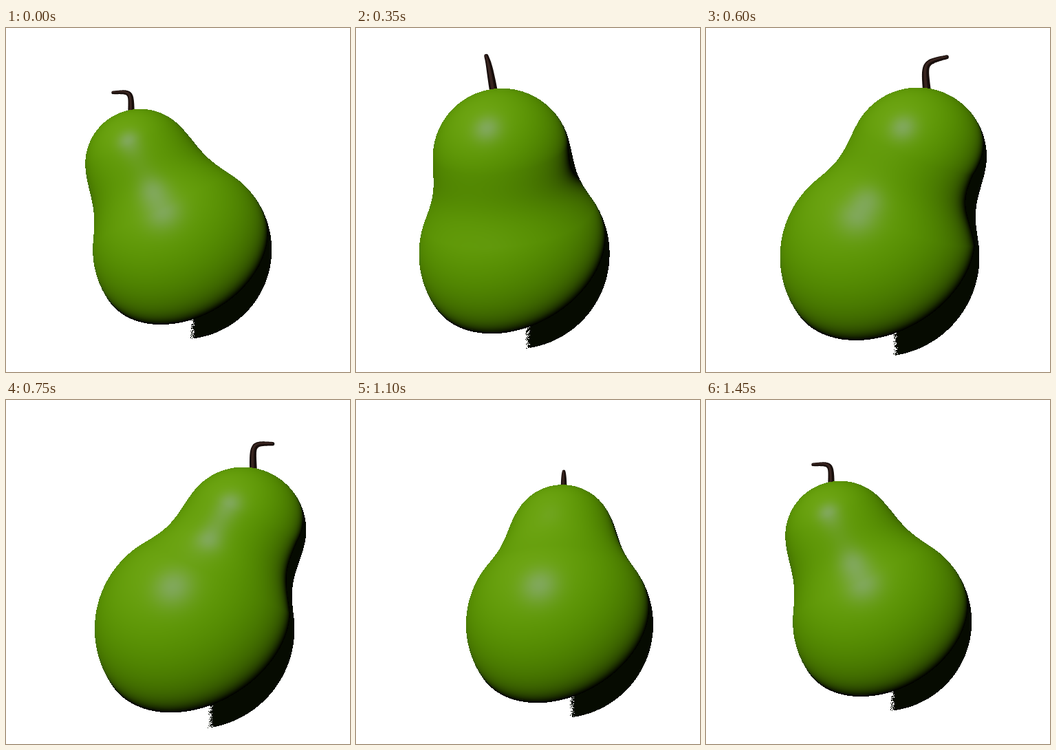
Animation, 500 px wide and 500 px high, one loop 1.5 s. Source, as an HTML page with a canvas:

```html
<!DOCTYPE html>
<html lang="en">
<head>
<meta charset="utf-8">
<title>Turning pear</title>
<style>
  html, body { margin: 0; width: 100%; height: 100%; overflow: hidden; background: #fff; }
  canvas { display: block; width: 500px; height: 500px; }
</style>
</head>
<body>
<canvas id="stage" width="500" height="500"></canvas>
<script>
const SIZE = 500, STEPS = 30, STEP_MS = 50, BLEND = 54;
const stage = document.getElementById('stage').getContext('2d');
const cache = [];

// Stem poses: step, then base, bend and tip relative to the top of the neck.
const STEM = [
  [0, -13, 3, -13, -26, -41, -24],
  [7, -12, 4, -19, -36, -23, -48],
  [12, 13, 3, 9, -37, 44, -45],
  [18, 12, 3, 13, -31, 33, -23],
  [22, 2, 3, 2, -16, 2, -20],
  [26, -8, 2, -8, -26, -27, -19],
  [29, -13, 3, -13, -26, -41, -24]
];

// Mean plus first and second harmonics of the turn angle.
const wave = (a, mean, c1, s1, c2 = 0, s2 = 0) =>
  mean + c1 * Math.cos(a) + s1 * Math.sin(a) + c2 * Math.cos(2 * a) + s2 * Math.sin(2 * a);

const random = (x, y) => {
  const v = Math.sin(x * 12.9898 + y * 78.233) * 43758.5453;
  return v - Math.floor(v);
};

function pose(a) {
  return {
    bulb: { x: wave(a, 263.4, -7.2, -33), y: wave(a, 327.6, -5.3, 1),
            z: wave(a, 0, -33, 7), r: wave(a, 137.4, -7.7, 1.25) },
    neck: { x: wave(a, 264, -73, -43.8, 4, -2.3), y: wave(a, 193, 4.5, -5),
            z: wave(a, 0, -36, 62), r: wave(a, 87, -6.7, 12.8, -0.85, -0.9) }
  };
}

// Marches along z to the blended surface; returns its normal or null.
function hit(px, py, bulb, neck) {
  const bx = px - bulb.x, by = py - bulb.y, nx = px - neck.x, ny = py - neck.y;
  const bFlat = bx * bx + by * by, nFlat = nx * nx + ny * ny;
  let z = 200;
  for (let i = 0; i < 60 && z > -180; i++) {
    const bz = z - bulb.z, nz = z - neck.z;
    const bLen = Math.sqrt(bFlat + bz * bz), nLen = Math.sqrt(nFlat + nz * nz);
    const db = bLen - bulb.r, dn = nLen - neck.r;
    const h = Math.max(0, Math.min(1, 0.5 + 0.5 * (db - dn) / BLEND));
    const d = db + (dn - db) * h - BLEND * h * (1 - h);
    if (d < 0.3) {
      const u = (1 - h) / bLen, v = h / nLen;
      const x = bx * u + nx * v, y = by * u + ny * v, w = bz * u + nz * v;
      const len = Math.hypot(x, y, w);
      return [x / len, y / len, w / len];
    }
    z -= d;
  }
  return null;
}

function shade([x, y, z]) {
  const lit = (-0.35 * x - 0.6 * y + 0.72 * z + 0.065) / 1.065;
  if (lit <= 0) return null;
  const green = 160 * Math.pow(lit, 0.33) * (1 - Math.exp(-14 * lit)), glow = lit ** 4;
  const shine = Math.pow(Math.max(0, -0.215 * x - 0.42 * y + 0.882 * z), 45);
  return [green * 0.6 + 12 * glow + 22 * shine, green + 4 * glow + 6 * shine, 18 * glow + 72 * shine];
}

function stemAt(step) {
  const last = STEM.length - 1;
  let i = 0;
  while (i < last - 1 && step >= STEM[i + 1][0]) i++;
  const p0 = STEM[(i + last - 1) % last], p1 = STEM[i], p2 = STEM[i + 1], p3 = STEM[(i + 2) % last];
  const t = (step - p1[0]) / (p2[0] - p1[0]);
  return p1.slice(1).map((b, k) => {
    const a = p0[k + 1], c = p2[k + 1], d = p3[k + 1];
    return b + t * (c - a + t * (2 * a - 5 * b + 4 * c - d + t * (3 * (b - c) + d - a))) / 2;
  });
}

// A tapering tube of discs, drawn behind the fruit: the lit side, then the dark body.
function drawStem(ctx, step, neck) {
  const [bx, by, mx, my, tx, ty] = stemAt(step);
  const along = (t, base, bend, tip) => (1 - t) ** 3 * base + 3 * t * (1 - t) * bend + t ** 3 * tip;
  ctx.translate(neck.x, neck.y - neck.r);
  ctx.globalCompositeOperation = 'destination-over';
  for (const [color, width, shift] of [['#38241f', 0.4, -0.8], ['#180e0b', 1, 0]]) {
    ctx.fillStyle = color;
    ctx.beginPath();
    for (let t = 0; t <= 1; t += 0.02) {
      const x = along(t, bx, mx, tx) + shift, y = along(t, by, my, ty) + shift;
      ctx.moveTo(x, y);
      ctx.arc(x, y, neck.r * (0.06 - 0.03 * t) * width, 0, 7);
    }
    ctx.fill();
  }
}

function render(step) {
  const { bulb, neck } = pose(step / (STEPS - 1) * 2 * Math.PI);
  const canvas = document.createElement('canvas');
  canvas.width = canvas.height = SIZE;
  const ctx = canvas.getContext('2d');
  const image = ctx.createImageData(SIZE, SIZE);
  const cut = bulb.x + 0.55 * bulb.r - 61;
  for (let y = 75; y < 482; y++) {
    for (let x = 80; x < 445; x++) {
      const normal = hit(x + 0.5, y + 0.5, bulb, neck);
      if (!normal) continue;
      let color = shade(normal);
      if (!color) {
        // The unlit side is see-through left of a ragged edge.
        if (x < cut + 8 * random(x, y)) continue;
        color = [6, 11, 1];
      }
      image.data.set([...color, 255], (y * SIZE + x) * 4);
    }
  }
  ctx.putImageData(image, 0, 0);
  drawStem(ctx, step, neck);
  return canvas;
}

let shown = -1;
function tick() {
  const step = Math.floor(performance.now() / STEP_MS) % STEPS;
  if (step !== shown) {
    cache[step] ||= render(step);
    stage.clearRect(0, 0, SIZE, SIZE);
    stage.drawImage(cache[step], 0, 0);
    shown = step;
  }
  requestAnimationFrame(tick);
}
tick();
</script>
</body>
</html>
```
